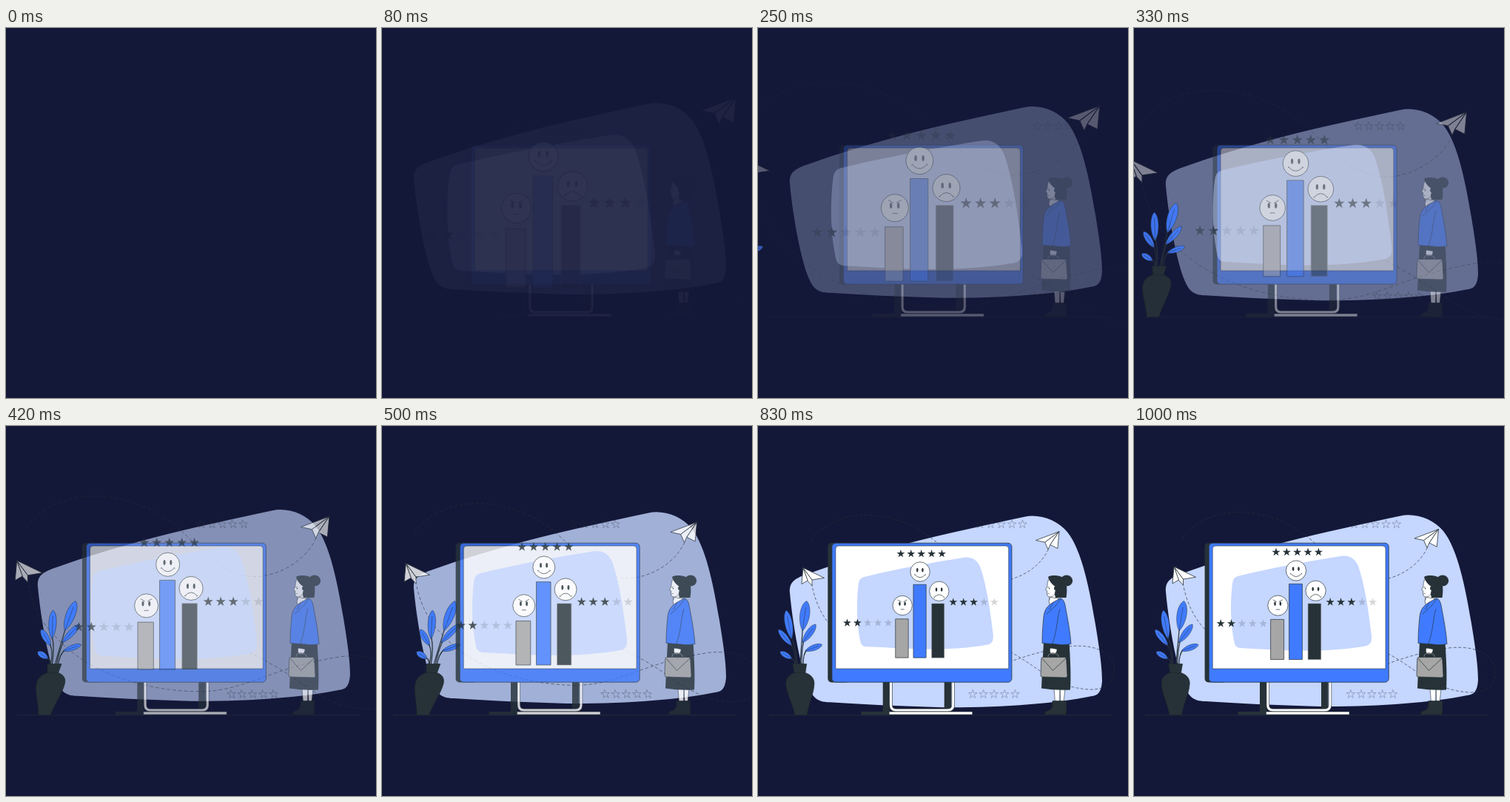
Write an HTML page with a canvas that moves like this. It is 500x500 px and loops after 1040 ms.

```html
<!DOCTYPE html>
<html lang="en">
<head>
<meta charset="utf-8">
<title>Rating infographic</title>
<style>
html, body { margin: 0; width: 100%; height: 100%; overflow: hidden; background: #141838; }
canvas { display: block; width: 500px; height: 500px; }
</style>
</head>
<body>
<canvas id="stage" width="500" height="500"></canvas>
<script>
const SIZE = 500, LOOP = 1040, STEP = 1000 / 24, LEAD = 0.03;
const DARK = '#263238', BLUE = '#407bff', PALE = '#c5d6ff', GRAY = '#a6a6a6', WHITE = '#fff';

const screen = document.getElementById('stage').getContext('2d');
const buffer = document.createElement('canvas');
buffer.width = buffer.height = SIZE;
const c = buffer.getContext('2d');

// cubic-bezier(.36, -.01, .5, 1.38), overshooting near the end
function ease(x) {
  if (x <= 0) return 0;
  if (x >= 1) return 1;
  const at = (s, a, b) => 3 * (1 - s) * (1 - s) * s * a + 3 * (1 - s) * s * s * b + s * s * s;
  let lo = 0, hi = 1;
  for (let i = 0; i < 30; i++) {
    const mid = (lo + hi) / 2;
    if (at(mid, 0.36, 0.5) < x) lo = mid; else hi = mid;
  }
  return at(lo, -0.01, 1.38);
}

// Drawing helpers
function shape(d, fill, stroke, width = 0.7) {
  const p = new Path2D(d);
  if (fill) { c.fillStyle = fill; c.fill(p); }
  if (stroke) { c.strokeStyle = stroke; c.lineWidth = width; c.stroke(p); }
}

function box(x, y, w, h, r, fill, stroke, width = 0.7) {
  c.beginPath();
  c.roundRect(x, y, w, h, r);
  if (fill) { c.fillStyle = fill; c.fill(); }
  if (stroke) { c.strokeStyle = stroke; c.lineWidth = width; c.stroke(); }
}

function oval(x, y, rx, ry, fill, stroke, width = 0.7) {
  c.beginPath();
  c.ellipse(x, y, rx, ry, 0, 0, 7);
  if (fill) { c.fillStyle = fill; c.fill(); }
  if (stroke) { c.strokeStyle = stroke; c.lineWidth = width; c.stroke(); }
}

function star(x, y, r) {
  c.beginPath();
  for (let i = 0; i < 10; i++) {
    const a = i * Math.PI / 5 - Math.PI / 2, q = i % 2 ? r * 0.39 : r;
    c.lineTo(x + q * Math.cos(a), y + q * Math.sin(a));
  }
  c.closePath();
}

function ratingRow(x, y, full) {
  for (let i = 0; i < 5; i++) {
    star(x + i * 14.35, y, 5.9);
    c.fillStyle = i < full ? DARK : 'rgba(38,50,56,.2)';
    c.fill();
  }
}

function outlineRow(x, y) {
  c.strokeStyle = 'rgba(38,50,56,.32)';
  c.lineWidth = 0.9;
  for (let i = 0; i < 5; i++) { star(x + i * 14.3, y, 6); c.stroke(); }
}

// Scene parts, drawn in their resting pose
function blob() {
  shape('M43 224C42 210 49 205 66 199C110 183 155 170 200 158C255 144 310 132 360 121.5' +
    'C380 117 405 126 418 142C438 167 448 220 455.5 264C461.5 300 465 325 465 343' +
    'C464 359 459 363 450 364C400 374 330 379.5 250 379C190 377 140 375 97 372' +
    'C78 372 73 364 66 346C55 313 46.5 262 43 224Z', PALE);
}

function floor() { shape('M15 390.8H478', null, DARK, 0.9); }

function routes() {
  c.setLineDash([4, 2.6]);
  shape('M65 152C95 108 180 100 243 157C268 180 295 213 335 208C365 203 388 184 397 163', null, DARK, 0.65);
  shape('M66 212C72 245 85 265 102 281C130 312 190 340 266 340C320 338 345 312 425 300' +
    'C470 295 488 315 488 332C488 350 478 360 455 360C405 358 385 330 344 308C335 303 327 297 313 294', null, DARK, 0.65);
  c.setLineDash([]);
}

function planes() {
  routes();
  c.lineJoin = 'round';
  for (const d of [
    'M411.5 139.5L391.5 154.5L396 164.5L399 158Z', 'M411.5 139.5L379 151.8L391.5 154.5Z',
    'M411.5 139.5L399 158L409.3 163.2Z',
    'M54 190L60 208L66.5 215L66.5 207Z', 'M54 190L52 212.8L60.5 208Z', 'M54 190L83.5 204.3L66.5 207Z'
  ]) shape(d, WHITE, DARK, 0.8);
}

function monitor() {
  box(95.6, 158, 30, 188.4, 5, DARK);
  box(170, 346, 9, 41, 0, DARK);
  box(253, 346, 9.5, 41, 0, DARK);
  box(140.5, 386, 50, 4.4, 0, DARK);
  const leg = 'M180.8 346V377Q180.8 384 187.5 384H258Q265 384 265 377V346';
  shape(leg, null, DARK, 4.3);
  shape(leg, null, WHITE, 3.1);
  box(178.5, 386.1, 112.5, 3.9, 0, WHITE, DARK, 0.6);
  box(101.2, 158.2, 243, 188, 5, BLUE, DARK, 0.8);
  box(106.2, 162, 233.8, 166, [4, 4, 0, 0], WHITE, DARK, 0.6);
}

function face(x, y, extra) {
  c.save();
  c.translate(x, y);
  oval(0, 0, 13.6, 13.6, WHITE, DARK, 0.7);
  oval(-3.9, -2.4, 1.3, 2.9, DARK);
  oval(3.5, -2.4, 1.3, 2.9, DARK);
  shape(extra, null, DARK, 0.7);
  c.restore();
}

function chart() {
  shape('M131 245C131.3 230 132 218 133.5 210C135 205 138 203.5 142 202.5C190 191 240 182 280 175.8' +
    'C292 174 299 180 303 189C312 215 317 250 320.8 282C322 293 319 296 312 297.5C285 302 260 303.8 225 303.5' +
    'C195 303 165 301 143 300C138 299 136.5 297 135.5 292C132 275 131 260 131 245Z', PALE);
  box(184.6, 261.4, 18, 54.1, 0, GRAY, DARK, 0.7);
  box(209.6, 213.4, 17.8, 102.1, 0, BLUE, DARK, 0.7);
  box(235.2, 240, 17.4, 75.5, 0, DARK, '#777', 0.5);
  face(219, 195.5, 'M-7.5 4Q0 12 7.5 4M-8.3 4.4L-6.8 3.4M8.3 4.4L6.8 3.4');
  face(194.4, 242.6, 'M-6.6 -7.8L-1.6 -5M6.4 -7.8L1.4 -5M-2.6 5.6Q0 5 2.6 5.6');
  face(245.6, 222.7, 'M-7 8.6Q0 .8 7 8.6M-7.8 8L-6.3 9.2M7.8 8L6.3 9.2');
  ratingRow(192, 170.5, 5);
  ratingRow(265.2, 238, 3);
  ratingRow(117.2, 267, 2);
}

function outlineStars() {
  outlineRow(297.6, 132.8);
  outlineRow(292.8, 362.5);
}

function leaf(x0, y0, x1, y1, w) {
  const dx = x1 - x0, dy = y1 - y0, n = Math.hypot(dx, dy), ox = -dy / n * w, oy = dx / n * w;
  const point = (k, side) => `${x0 + dx * k + ox * side} ${y0 + dy * k + oy * side}`;
  shape(`M${x0} ${y0}C${point(0.3, 1)} ${point(0.85, 1)} ${x1} ${y1}` +
    `C${point(0.85, -1)} ${point(0.3, -1)} ${x0} ${y0}Z`, BLUE, DARK, 0.5);
  shape(`M${x0} ${y0}L${point(0.8, 0)}`, null, DARK, 0.5);
}

function plant() {
  shape('M53 322C52 305 50 295 46 286M57 322C58 305 60 290 61 276M59 322C59 308 60 300 62 292' +
    'M61 322C61 312 62 307 66 303M51 322C51 308 49 301 45 296M50 322C50 317 48 315 45 313.5', null, DARK, 1.2);
  leaf(61, 277, 67.5, 236.5, 8.6);
  leaf(46, 288, 39.5, 249, 6.8);
  leaf(46, 297, 28.5, 275, 5.2);
  leaf(46, 314.5, 30, 305, 4.8);
  leaf(60.5, 293, 79, 268, 6);
  leaf(64, 304, 87, 295.5, 5);
  shape('M46.5 321.5H65.5L63.5 333.5C71 336 75.5 341 75.2 348C74.5 362 67 375 64.5 390.8H48' +
    'C45.5 375 37.5 362 37 348C36.8 341 41.5 336 48.8 333.5Z', DARK, '#1b252a', 0.6);
  shape('M48.8 333.5H63.5', null, '#1b252a', 0.6);
}

function woman() {
  // legs and boots
  shape('M400 354L401.5 374H407.5L408 354ZM408 354L409 374H413L415 354Z', WHITE, DARK, 0.6);
  shape('M398 371.5H417L416.5 390H388C386.5 387 389 385.5 393 384.5C397 382.5 398.5 379 398 371.5Z', DARK, '#1b252a', 0.6);
  shape('M386 292H420.5C422 315 423 337 422 356.5Q402 357.5 383 354.5C384 332 385 312 386 292Z', DARK);
  // head
  shape('M394 225L393.5 238L405 240L407 224Z', WHITE, DARK, 0.6);
  shape('M393 207C391 211 391 214 391 216L388.7 221.6L390.6 222.6L390.6 227C391 231 394 231.5 397 230.5' +
    'C402 229 405 220 404 208Z', WHITE, DARK, 0.6);
  shape('M391.2 218.2L393.8 217.6M391.4 226.5L393.6 226.4', null, DARK, 0.6);
  oval(393.6, 219.6, 0.6, 0.9, DARK);
  oval(417, 209, 8.2, 7.6, DARK);
  shape('M392 204C396 201 409 201.5 413.5 206C418 212 418 224 416.5 232H402C400.5 228 401 224 402 222' +
    'C399.5 222 399.5 217 401.5 217C398 214 394 211 392 204Z', DARK);
  // jacket
  shape('M393 237L395 231.5L405 233L409 236L396 247Z', WHITE, DARK, 0.6);
  shape('M399 238L409 232.8C412 234 414 237 415 242C418 258 422 278 423 294.5C416 296 410 296 404 295' +
    'L384 293.5C384 280 385 268 386 258C387 248 391 243 399 238Z', BLUE, DARK, 0.7);
  shape('M409 232.8C406 240 398 247 390 254M399 238L393.5 248M408 247C403 262 405 282 394.5 301', null, DARK, 0.6);
  // hand and bag
  shape('M395 300C393.5 305 395 308 398 308.5C402 308.5 404 306 404 301.5Z', WHITE, DARK, 0.6);
  const handle = 'M392 313C392 308 394 307.4 398 307.4C403 307.4 406 308 406.5 313';
  shape(handle, null, DARK, 1.7);
  shape(handle, null, GRAY, 0.7);
  shape('M384.5 312.5H414.5Q416.5 312.5 416.7 315L418 337.5Q418 340 415.5 340L384 339' +
    'Q381.8 339 382 336.5L382.8 314.5Q383 312.5 384.5 312.5Z', GRAY, DARK, 0.7);
  shape('M384 314L398.5 330.5L416 314', null, DARK, 0.7);
}

// Entrances: each returns an opacity after moving the buffer
const fade = t => ease(t);

const slide = (dx, dy) => t => {
  const e = ease(t);
  c.translate(dx * (1 - e), dy * (1 - e));
  return e;
};

const zoom = (x, y) => t => {
  const e = ease(t), s = 1.5 - 0.5 * e;
  c.translate(x, y);
  c.scale(s, s);
  c.translate(-x, -y);
  return e;
};

// Rushes in from one side, leaning, then settles
const rush = (dir, y) => t => {
  let x = 0, lean, alpha = 1;
  if (t < 0.6) {
    alpha = ease(t / 0.6);
    x = 250 * (1 - alpha) * dir;
    lean = -20 + 30 * alpha;
  } else if (t < 0.8) {
    lean = 10 - 12 * ease((t - 0.6) / 0.2);
  } else {
    lean = -2 + 2 * ease((t - 0.8) / 0.2);
  }
  const k = Math.tan(lean * dir * Math.PI / 180);
  c.transform(1, 0, k, 1, x - k * y, 0);
  return alpha;
};

const layers = [
  [blob, slide(0, -20)],
  [floor, fade],
  [outlineStars, rush(1, 248)],
  [planes, zoom(271, 236)],
  [plant, rush(-1, 314)],
  [monitor, slide(20, 0)],
  [chart, zoom(220.7, 241)],
  [woman, fade]
];

function draw(now) {
  const k = Math.min(24, Math.floor((now % LOOP + 3.4) / STEP));
  const t = k ? Math.min(1, k * STEP / 1000 + LEAD) : 0;
  screen.globalAlpha = 1;
  screen.fillStyle = '#141838';
  screen.fillRect(0, 0, SIZE, SIZE);
  for (const [paint, enter] of layers) {
    c.setTransform(1, 0, 0, 1, 0, 0);
    c.clearRect(0, 0, SIZE, SIZE);
    const alpha = enter(t);
    paint();
    screen.globalAlpha = Math.max(0, Math.min(1, alpha));
    screen.drawImage(buffer, 0, 0);
  }
}

const start = performance.now();
function tick() {
  draw(performance.now() - start);
  requestAnimationFrame(tick);
}
tick();
</script>
</body>
</html>
```
